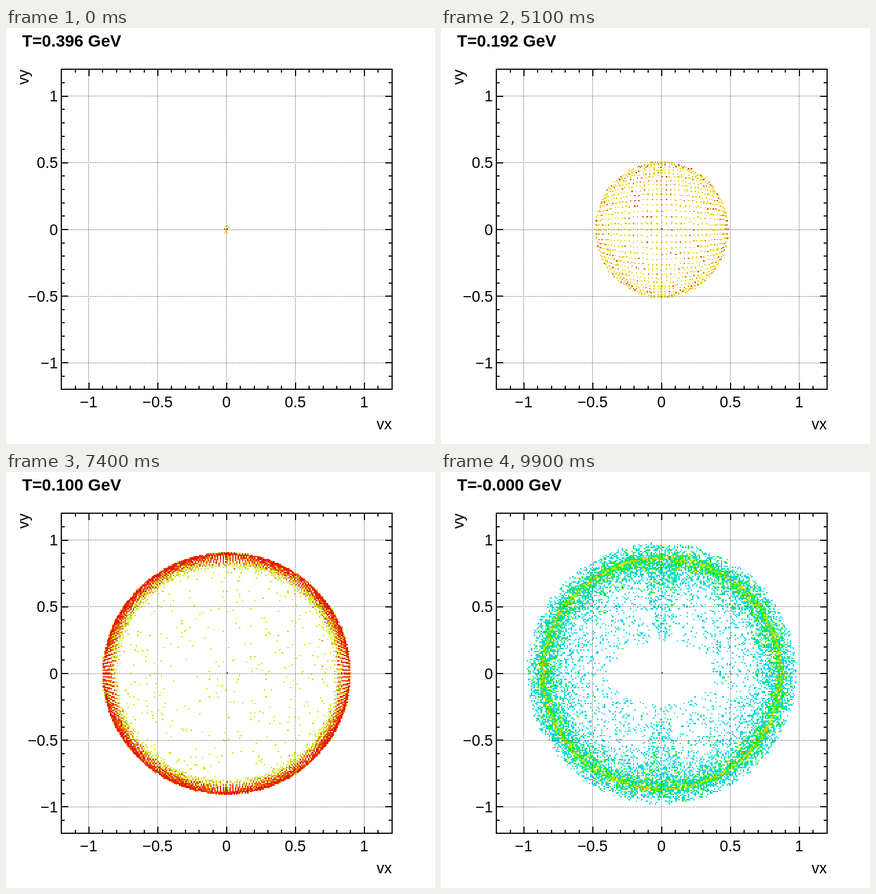
An HTML page with a canvas that plays this animation: 760 by 737 pixels, repeating every 10 s.

```html
<!DOCTYPE html>
<html lang="en">
<head>
<meta charset="utf-8">
<title>Velocity distribution</title>
<style>
html, body { margin: 0; width: 100%; height: 100%; overflow: hidden; background: #fff; }
canvas { display: block; }
</style>
</head>
<body>
<canvas id="stage" width="760" height="737"></canvas>
<script>
const ctx = document.getElementById('stage').getContext('2d');
const FONT = '"Liberation Sans", Arial, sans-serif';
const CX = 390.9, CY = 357, UX = 243.9, UY = 236.4, LIMIT = 1.2;
const BINS = 240, BW = UX / 100, BH = UY / 100;
const LEFT = CX - LIMIT * UX, TOP = CY - LIMIT * UY;
const FRAMES = 100, STEP = 100, TURN = 2 * Math.PI;

const mix = (a, b, t) => a + (b - a) * t;
const clamp = t => Math.min(1, Math.max(0, t));
const expo = rnd => -Math.log(1 - rnd());

function random(seed) {
  let s = seed | 0;
  return () => {
    s = (s + 0x6D2B79F5) | 0;
    let n = Math.imul(s ^ (s >>> 15), s | 1);
    n ^= n + Math.imul(n ^ (n >>> 7), n | 61);
    return ((n ^ (n >>> 14)) >>> 0) / 4294967296;
  };
}

// Level 1 is red; lower levels run through yellow and green to cyan.
const colour = level => `hsl(${185 * (clamp(1 - level) / 0.69) ** 1.6}, 92%, 48%)`;

// The momentum of the surface grows exponentially, so its speed tends to 1.
function stateAt(step) {
  const ramp = (a, b) => clamp((step - a) / (b - a));
  const momentum = Math.exp((step - 60) / 16);
  const speed = momentum / Math.hypot(1, momentum);
  const ring = ramp(51, 68), thin = ramp(68, 80), blur = ramp(80, 89), end = ramp(89, 99);
  return {
    rx: 237 * speed,
    ry: 230 * speed ** 0.93,
    size: 2 * Math.exp(Math.min(step, 70) / 22),
    ring,
    hole: 0.6 * ring,
    inner: mix(0.78 * ring, 0.972, thin),
    copies: 1 + 4 * Math.exp(-(((step - 69) / 11) ** 2)) + 3 * end,
    spread: 0.15 + 1.35 * ring,
    noise: 1.5 - ramp(0, 50) + 1.2 * blur + 18 * end ** 2,
    centre: 1 - 0.01 * blur - 0.09 * end ** 2,
    tail: 250 * ramp(55, 68) + 2400 * ramp(68, 90) + 3000 * end,
    reach: 0.08 + 0.25 * (1 - thin) + 0.09 * end,
    hollow: end,
    base: 0.68 - 0.09 * ramp(55, 89) - 0.28 * end
  };
}

function histogram(p) {
  const counts = new Uint16Array(BINS * BINS);

  function add(x, y) {
    if (Math.hypot(x / p.rx, y / p.ry) > 1.01) return;
    const col = Math.floor((CX + x - LEFT) / BW);
    const row = Math.floor((CY + y - TOP) / BH);
    counts[row * BINS + col]++;
  }

  // A square lattice of fluid cells, moved outward along the radius
  const tall = p.size * 0.8, nx = Math.ceil(p.size), ny = Math.ceil(tall);
  for (let b = -ny; b <= ny; b++) {
    for (let a = -nx; a <= nx; a++) {
      const q = Math.hypot(a / p.size, b / tall);
      if (q > 1 || q < p.hole) continue;
      const angle = Math.atan2(b / tall, a / p.size);
      const rnd = random((a + 100) * 92821 + (b + 100) * 68917);
      const depth = (q - p.hole) / (1 - p.hole);
      const copies = p.copies * mix(1, Math.min(1, 2 * depth), p.ring);
      for (let k = 0; k < copies; k++) {
        const keep = rnd() < copies - k;
        const shift = (rnd() - 0.5) * p.spread / p.size;
        const far = Math.sqrt(2 * expo(rnd)) * p.noise * 1.5 * rnd();
        const turn = rnd() * TURN;
        if (!keep) continue;
        const s = clamp(depth + shift / (1 - p.hole));
        const r = p.centre * mix(p.inner, 1, 1 - (1 - s) ** 1.6);
        add(p.rx * r * Math.cos(angle) + far * Math.cos(turn),
            p.ry * r * Math.sin(angle) + far * Math.sin(turn));
      }
    }
  }

  // Slower particles trailing towards the middle
  const rnd = random(4711);
  for (let i = 0; i < p.tail; i++) {
    let angle = rnd() * TURN;
    let r = p.centre - p.reach * expo(rnd) ** 1.5;
    const pick = rnd(), depth = rnd();
    if (pick < 0.1 * p.hollow) {
      angle = (angle < Math.PI ? 0.5 : 1.5) * Math.PI + (angle % 1 - 0.5) * 0.35;
      r = mix(0.25, 0.85, Math.sqrt(depth));
    }
    if (r < 0.08) continue;
    const x = p.rx * r * Math.cos(angle), y = p.ry * r * Math.sin(angle);
    if (Math.hypot(x / 90, y / 55) > p.hollow) add(x, y);
  }
  return counts;
}

function drawBin(col, row, fill) {
  const x = Math.round(LEFT + col * BW), y = Math.round(TOP + row * BH);
  ctx.fillStyle = fill;
  ctx.fillRect(x, y, Math.round(LEFT + (col + 1) * BW) - x, Math.round(TOP + (row + 1) * BH) - y);
}

function line(x1, y1, x2, y2) {
  ctx.beginPath();
  ctx.moveTo(x1, y1);
  ctx.lineTo(x2, y2);
  ctx.stroke();
}

function text(str, x, y, align, font = '27px ') {
  ctx.font = font + FONT;
  ctx.textAlign = align;
  ctx.fillText(str, x, y);
}

function drawAxes() {
  const l = Math.round(LEFT), r = 684, t = 73, b = 640;
  ctx.strokeStyle = ctx.fillStyle = '#000';
  ctx.lineWidth = 1;
  ctx.setLineDash([1, 2]);
  for (let v = -1; v <= 1; v += 0.5) {
    const x = Math.floor(CX + v * UX) + 0.5, y = Math.floor(CY - v * UY) + 0.5;
    line(x, t, x, b);
    line(l, y, r, y);
    const label = String(v).replace('-', '\u2212');
    text(label, x, 672, 'center');
    text(label, 92, y + 9.5, 'right');
  }
  ctx.setLineDash([]);
  ctx.lineWidth = 2;
  ctx.strokeRect(l, t, r - l, b - t);
  for (let i = -11; i <= 11; i++) {
    const len = i % 5 ? 6 : 12;
    const x = Math.round(CX + i * UX / 10), y = Math.round(CY - i * UY / 10);
    line(x, t, x, t + len);
    line(x, b, x, b - len);
    line(l, y, l + len, y);
    line(r, y, r - len, y);
  }
  text('vx', 683.5, 711, 'right');
  ctx.save();
  ctx.translate(40, 73.5);
  ctx.rotate(-Math.PI / 2);
  text('vy', 0, 0, 'right');
  ctx.restore();
}

function draw(step) {
  ctx.fillStyle = '#fff';
  ctx.fillRect(0, 0, 760, 737);
  const state = stateAt(step);
  histogram(state).forEach((n, i) => {
    if (!n) return;
    const level = Math.min(0.95, state.base + 0.15 * Math.log2(n));
    drawBin(i % BINS, Math.floor(i / BINS), colour(level));
  });
  drawBin(BINS / 2, BINS / 2 - 1, '#800000');
  drawAxes();
  // The temperature ends a hair below zero.
  const value = (0.396 - 0.004 * step - 1e-9).toFixed(3);
  text(`T=${value} GeV`, 28.5, 33, 'left', 'bold 29.4px ');
}

ctx.fontKerning = 'none';
let shown = -1;
function tick() {
  const step = Math.floor(performance.now() / STEP) % FRAMES;
  if (step !== shown) draw(shown = step);
  requestAnimationFrame(tick);
}
tick();
</script>
</body>
</html>
```
